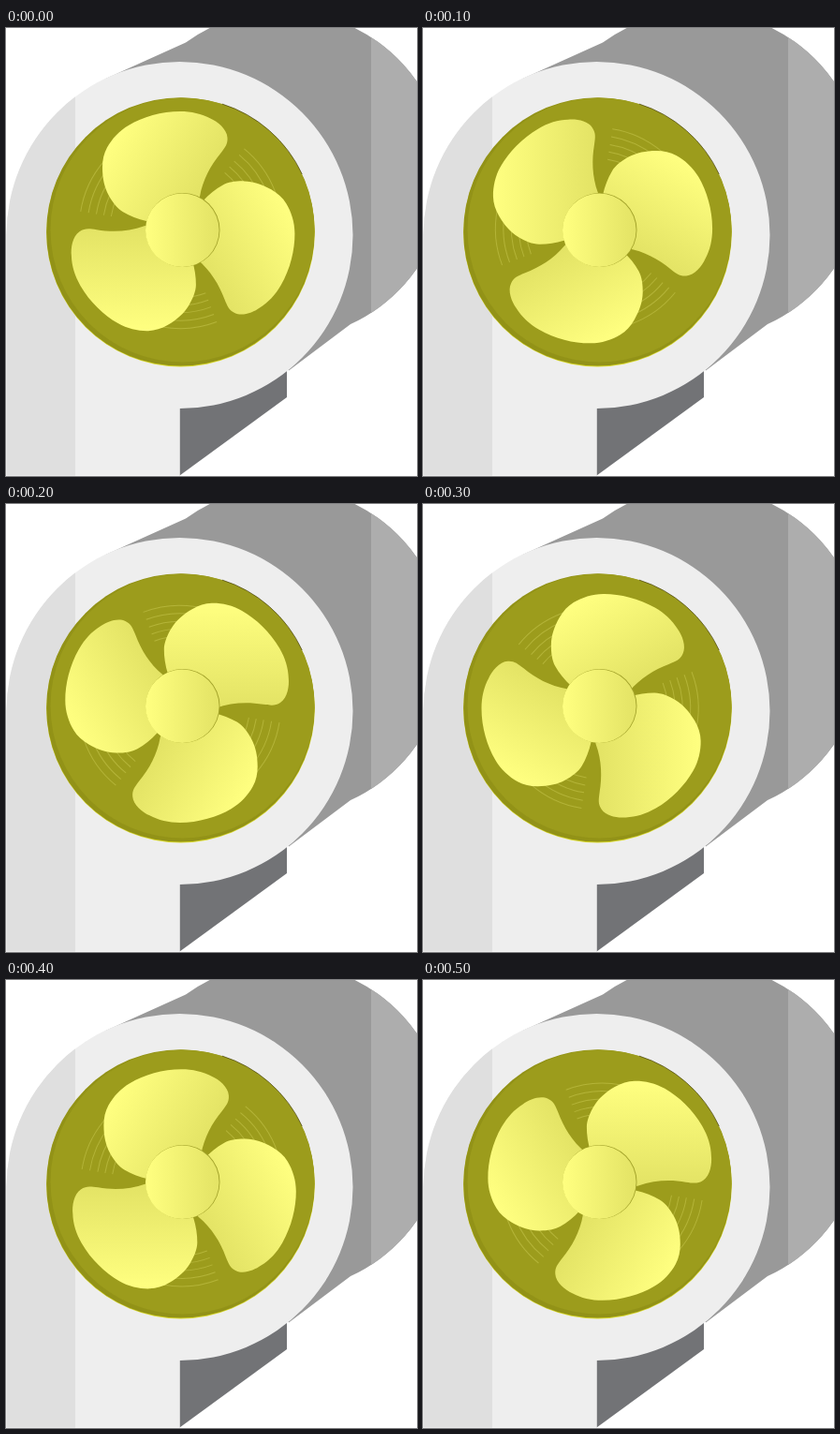
Recreate the animation shown at these times as an HTML page. Size 439 px wide and 478 px high, loop 600 ms.

```html
<!DOCTYPE html>
<html lang="en">
<head>
<meta charset="utf-8">
<title>Fan</title>
<style>
  html, body { margin: 0; width: 100%; height: 100%; overflow: hidden; background: #fff; }
  svg { display: block; }
</style>
</head>
<body>
<svg width="439" height="478" viewBox="0 0 439 478">
  <defs>
    <linearGradient id="bladeFill" gradientUnits="userSpaceOnUse" x1="186.4" y1="212.7" x2="91.4" y2="157.7">
      <stop stop-color="#e3e365"/><stop offset="1" stop-color="#ffff80"/>
    </linearGradient>
    <linearGradient id="hubFill">
      <stop stop-color="#ffff80"/><stop offset="1" stop-color="#e3e365"/>
    </linearGradient>
    <clipPath id="bodyEdge"><path d="M390 0H439V478H390Z"/></clipPath>
    <clipPath id="frontEdge"><path d="M0 0H74V478H0Z"/></clipPath>
    <path id="body" d="M106 54.3L192 15.5A175 175 0 1 1 368 316L302 365.5Z"/>
    <path id="front" d="M.5 477.5V221A185 185 0 0 1 370.5 221A185 185 0 0 1 185.5 406V477.5Z"/>
    <path id="blade" fill="url(#bladeFill)" d="M186 213L200 202L207 180C210 162 219 146 229 134
      C234 127.5 237 124 236.5 117C236 108 226 100 218.3 96.6C209 91.5 198 89 186 89
      C166 89 146 95 131.2 103.7C121 109.5 113 118.5 108 127.6C104.5 134 103 141 103 149
      C103 160 105 170 109.7 178.5C113.5 185.5 119 192.8 125 196.3C132 200.5 141 204 150 206Z"/>
  </defs>

  <!-- housing -->
  <path d="M185.5 400L300 360V394L185.5 477.5Z" fill="#727376"/>
  <use href="#body" fill="#999"/>
  <use href="#body" fill="#adadad" clip-path="url(#bodyEdge)"/>
  <use href="#front" fill="#eee"/>
  <use href="#front" fill="#dfdfdf" clip-path="url(#frontEdge)"/>

  <!-- opening -->
  <circle cx="186.5" cy="218.2" r="143.3" fill="#d8d82c"/>
  <circle cx="186.4" cy="217.4" r="143.2" fill="#929217"/>
  <circle cx="188.5" cy="215.5" r="141" fill="#9c9c1c"/>
  <path d="M231 81.1A141 141 0 0 1 316.3 156" fill="none" stroke="#4a4410" stroke-width=".7"/>

  <g id="fan">
    <g id="streaks" fill="none" stroke="#b4b438"></g>
    <use href="#blade"/>
    <use href="#blade" transform="rotate(120 186.4 212.7)"/>
    <use href="#blade" transform="rotate(240 186.4 212.7)"/>
  </g>

  <circle cx="188.9" cy="215.5" r="39.6" fill="#a3a32a"/>
  <circle cx="188.3" cy="215.8" r="39.3" fill="url(#hubFill)"/>
</svg>
<script>
const STEP = 100;
const ANGLES = [0, 30, 60, 90, 120, 180];
const fan = document.getElementById('fan');

// three short arcs per radius, one in each gap between blades
document.getElementById('streaks').innerHTML = [108, 99.5, 91, 83, 75].map(r =>
  `<circle cx="186.4" cy="212.7" r="${r}" pathLength="360" stroke-dasharray="32 88"
    transform="rotate(69 186.4 212.7)"/>`).join('');

function draw(now) {
  const angle = ANGLES[Math.floor(now / STEP) % ANGLES.length];
  fan.setAttribute('transform', `rotate(${-angle} 188.9 215.4)`);
  requestAnimationFrame(draw);
}
const start = performance.now();
draw(0);
function draw0(now) { return Math.max(0, now - start); }
</script>
</body>
</html>
```
